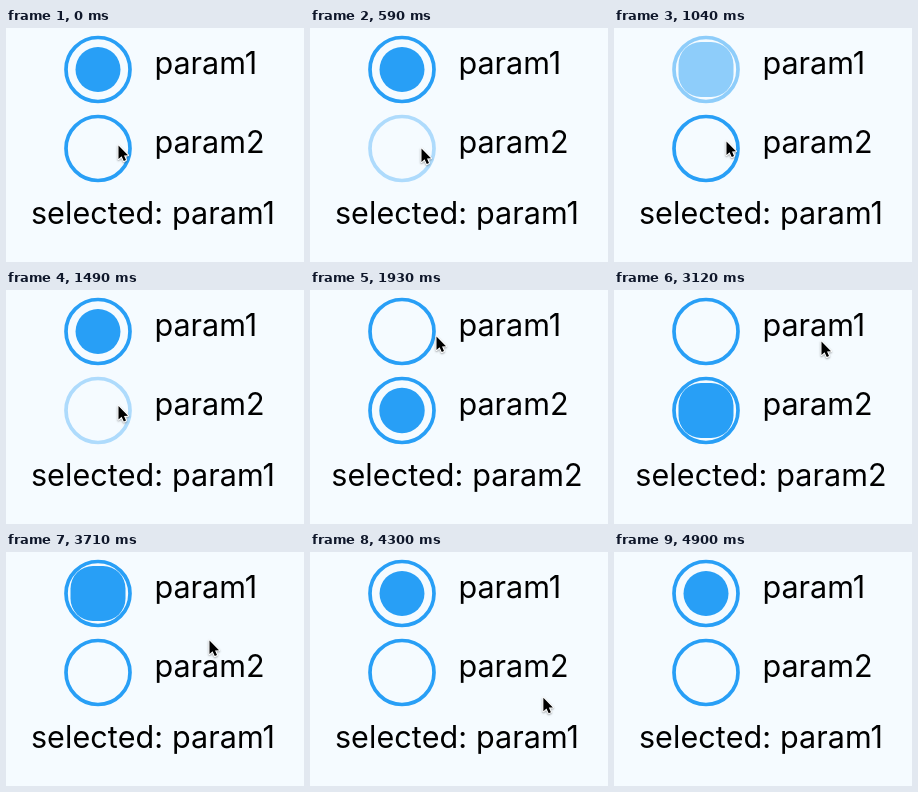
These frames come from a looping animation (298x234 px, 5.65 s). An HTML page with a canvas:

```html
<!DOCTYPE html>
<html lang="en">
<head>
<meta charset="utf-8">
<title>Radio buttons</title>
<style>
  html, body { margin: 0; width: 100%; height: 100%; overflow: hidden; background: #f5fbff; }
  canvas { display: block; width: 298px; height: 234px; }
</style>
</head>
<body>
<canvas id="stage" width="298" height="234"></canvas>
<script>
const ctx = document.getElementById('stage').getContext('2d');
const LOOP = 5650, STEP = 148.4;
const BLUE = '#289ff6', BACK = '#f5fbff';
const FONT = '30.5px Inter, "Liberation Sans", sans-serif';
const DOT = 45;
const ROWS = [41.5, 120.5];

// Steps at which the selection flips to the other row.
const picks = [4, 7, 11, 15, 21, 25];
const CIRCLE_TAPS = 4; // the first taps hit a circle, the later ones a label

// Pointer stops: step, x, y.
const stops = [
  [0, 112, 117], [3, 111, 120], [6, 104, 52], [7, 112, 113], [11, 112, 116],
  [13, 126, 46], [14, 112, 46], [17, 200, 58], [19, 204, 108], [21, 207, 51],
  [23, 208, 34], [25, 203, 88], [29, 238, 155], [33, 210, 260]
];

function pointerAt(step) {
  const i = stops.findIndex(s => s[0] > step);
  if (i < 0) return stops[stops.length - 1].slice(1);
  const [t0, x0, y0] = stops[i - 1], [t1, x1, y1] = stops[i];
  const k = (1 - Math.cos(Math.PI * (step - t0) / (t1 - t0))) / 2;
  return [x0 + (x1 - x0) * k, y0 + (y1 - y0) * k];
}

// A damped spring: large at first, then slightly small, then at rest.
const dotSize = age => DOT + 10 * Math.exp(-1.6 * age) * Math.cos(Math.PI * age);

function touchAlpha(row, step) {
  const taps = picks.slice(0, CIRCLE_TAPS).filter((p, i) => (i + 1) % 2 === row);
  if (taps.includes(step + 1)) return 0.35;
  return taps.includes(step) ? 0.5 : 1;
}

function radio(row, step, selected, age) {
  const x = 92, y = ROWS[row];
  ctx.globalAlpha = touchAlpha(row, step);
  ctx.strokeStyle = ctx.fillStyle = BLUE;
  ctx.lineWidth = 3.7;
  ctx.beginPath();
  ctx.arc(x, y, 32, 0, Math.PI * 2);
  ctx.stroke();
  if (selected) {
    const size = dotSize(age);
    ctx.beginPath();
    ctx.roundRect(x - size / 2, y - size / 2, size, size, Math.min(size, DOT) / 2);
    ctx.fill();
  }
  ctx.globalAlpha = 1;
}

function label(text, x, y, align, spacing = 0) {
  ctx.font = FONT;
  ctx.letterSpacing = spacing + 'px';
  ctx.textAlign = align;
  ctx.fillStyle = '#000';
  ctx.fillText(text, x, y);
}

function pointer(x, y) {
  ctx.save();
  ctx.translate(x, y);
  ctx.beginPath();
  [[0.5, 0.5], [0.5, 14], [3.6, 11.2], [5.8, 16], [8, 15], [6, 10.4], [10, 10.2]]
    .forEach(p => ctx.lineTo(...p));
  ctx.closePath();
  ctx.lineJoin = 'round';
  ctx.lineWidth = 2;
  ctx.strokeStyle = '#fff';
  ctx.shadowColor = 'rgba(0,0,0,.35)';
  ctx.shadowBlur = 2;
  ctx.shadowOffsetY = 1;
  ctx.stroke();
  ctx.shadowColor = 'transparent';
  ctx.fillStyle = '#000';
  ctx.fill();
  ctx.restore();
}

function draw(t) {
  const step = Math.floor(t / STEP);
  const done = picks.filter(p => p <= step);
  const chosen = done.length % 2;
  const age = done.length ? step - done[done.length - 1] : Infinity;

  ctx.fillStyle = BACK;
  ctx.fillRect(0, 0, 298, 234);
  ROWS.forEach((y, row) => {
    radio(row, step, row === chosen, age === Infinity ? 99 : age);
    label('param' + (row + 1), 148.5, y + 4, 'left');
  });
  label('selected: param' + (chosen + 1), 147, 195.7, 'center', 0.1);
  pointer(...pointerAt(step));
}

const start = performance.now();
function tick() {
  draw((performance.now() - start) % LOOP);
  requestAnimationFrame(tick);
}
tick();
</script>
</body>
</html>
```
